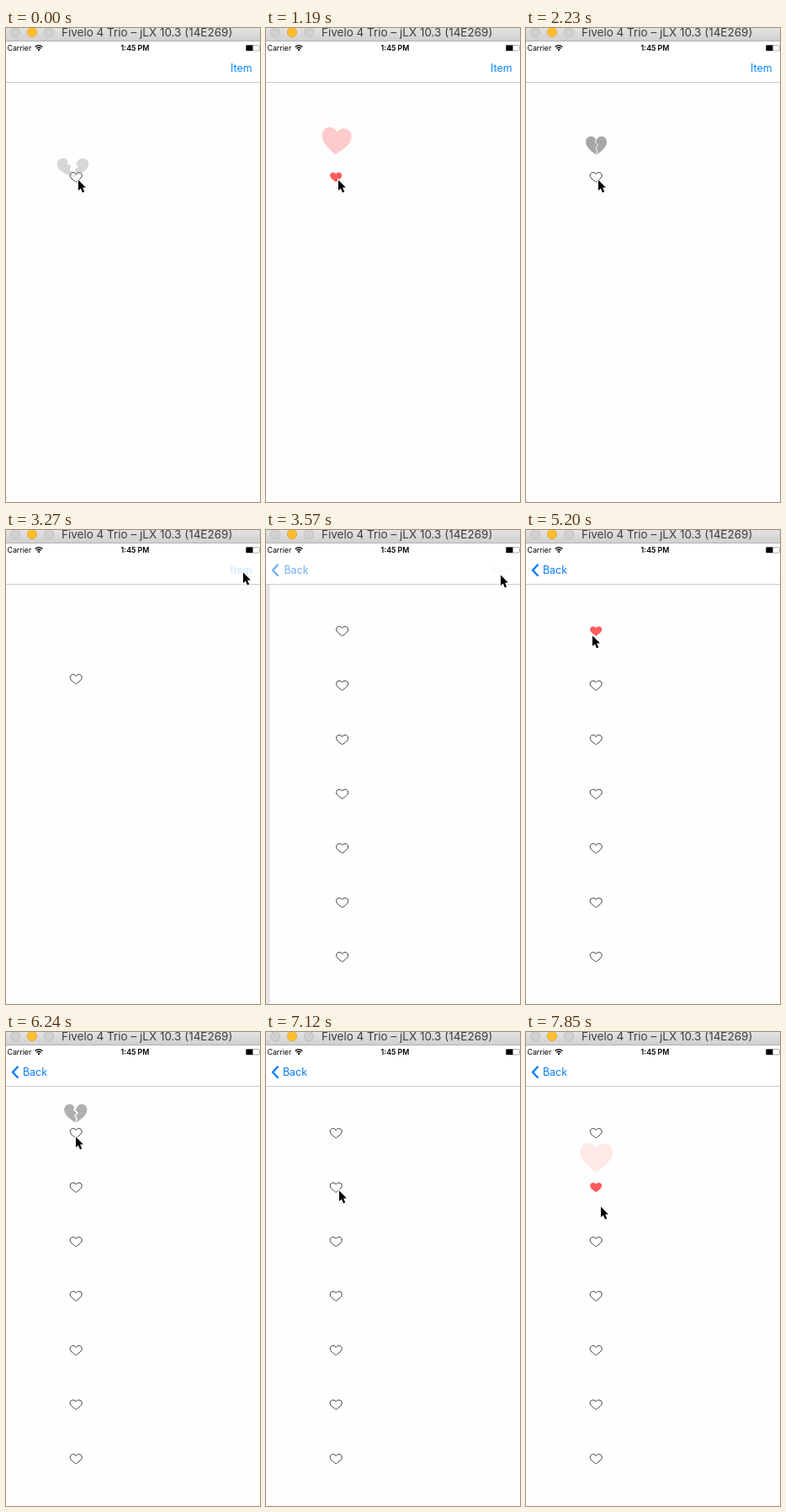
Animation, 302 px wide and 563 px high, one loop 8000 ms. Source, as an HTML page:

```html
<!DOCTYPE html>
<html lang="en">
<head>
<meta charset="utf-8">
<title>Like button</title>
<style>
  html, body { margin: 0; width: 100%; height: 100%; overflow: hidden; background: #fefefe; }
  svg { display: block; width: 302px; height: 563px; font-family: Inter, Roboto, sans-serif; }
  .small { fill: none; stroke: #3a3a3a; stroke-width: 1; }
  .small.on { fill: #ff5a5c; stroke: none; }
</style>
</head>
<body>
<svg viewBox="0 0 302 563">
  <defs>
    <linearGradient id="bar" x2="0" y2="1">
      <stop stop-color="#e3e3e3"/><stop offset="1" stop-color="#d0d0d0"/>
    </linearGradient>
    <path id="heart" vector-effect="non-scaling-stroke" d="M0 46C-6 36-50 14-50-18C-50-36-38-46-25-46C-12-46-3-38 0-30C3-38 12-46 25-46C38-46 50-36 50-18C50 14 6 36 0 46Z"/>
  </defs>

  <rect width="302" height="563" fill="#fefefe"/>
  <g id="first"></g>
  <rect id="dim" y="65" height="498"/>
  <g id="list"><rect id="sheet" y="65" width="310" height="498" fill="#fefefe"/></g>

  <rect y="15" width="302" height="49" fill="#fff"/>
  <rect y="64" width="302" height="1" fill="#cacaca"/>
  <rect width="302" height="15" fill="url(#bar)"/>
  <rect y="15" width="302" height="1" fill="#b4b4b4"/>
  <g fill="#d0d0d0" stroke="#bcbcbc" stroke-width=".8">
    <circle cx="11" cy="5" r="5.7"/>
    <circle cx="31" cy="5" r="5.7" fill="#ffbe2f" stroke="#e2a52b"/>
    <circle cx="51" cy="5" r="5.7"/>
  </g>
  <text x="66" y="10" font-size="13.5" fill="#3d3d3d">Fivelo 4 Trio – jLX 10.3 (14E269)</text>
  <text x="1.5" y="27" font-size="8.8">Carrier</text>
  <text x="153.5" y="27" font-size="8.8" font-weight="600" text-anchor="middle">1:45 PM</text>
  <g fill="none" stroke="#000" stroke-width="1.3">
    <path d="M34.6 22.4Q39 18.8 43.4 22.4M36.3 24.3Q39 22.2 41.7 24.3"/>
    <circle cx="39" cy="26" r=".5"/>
  </g>
  <rect x="285.5" y="20.5" width="16" height="6.5" rx="1" fill="#fff" stroke="#a0a0a0" stroke-width=".8"/>
  <rect x="285.5" y="20.5" width="8" height="6.5"/>

  <g font-size="12.4" fill="#0a7cf5">
    <text id="item" x="267" y="52" fill="#0a84ff">Item</text>
    <g id="back">
      <path d="M14.5 40.8L8 47.7L14.5 54.8" fill="none" stroke="#0a7cf5" stroke-width="2.3"/>
      <text id="backText" x="20" y="52">Back</text>
    </g>
  </g>

  <use id="burst" href="#heart" fill="#ff5a5c"/>
  <g id="broken" fill="#a6a6a6">
    <path id="left" d="M0 46C-6 36-50 14-50-18C-50-36-38-46-25-46C-12-46-3-38 0-30L-6-16L9-3L-3 10L5 24Z"/>
    <path id="right" d="M0 46C6 36 50 14 50-18C50-36 38-46 25-46C12-46 3-38 0-30L-6-16L9-3L-3 10L5 24Z"/>
  </g>
  <path id="cursor" d="M1 1.5V14L3.9 11.4L6 16.4L8.2 15.4L6.1 10.6H9.9Z" stroke="#fff" stroke-width="2" paint-order="stroke"/>
</svg>
<script>
const $ = id => document.getElementById(id);
const LOOP = 8000, STEP = LOOP / 54;
const HX = 83.2, MAIN_Y = 177, rowY = i => 120 + 64.5 * i;

function addHeart(parent, y) {
  const h = document.createElementNS('http://www.w3.org/2000/svg', 'use');
  h.setAttribute('href', '#heart');
  h.setAttribute('class', 'small');
  h.setAttribute('transform', `translate(${HX} ${y + .3}) scale(.14 .124)`);
  return parent.appendChild(h);
}
const mainHeart = addHeart($('first'), MAIN_Y);
const rows = Array.from({ length: 7 }, (_, i) => addHeart($('list'), rowY(i)));

// Rising hearts and breaking hearts: start time, base y, travel
const LIKES = [[723, MAIN_Y, 62], [4470, rowY(0), 40], [7280, rowY(1), 40]];
const BREAKS = [[-1035, MAIN_Y, 38], [1790, MAIN_Y, 38], [5480, rowY(0), 28]];
const LIKE_MS = 740, POP_MS = 140, BREAK_MS = 1170;

const CURSOR = [[0, 85, 179], [2400, 85, 179], [2900, 281, 42], [3260, 281, 49],
  [3560, 278, 52], [4020, 90, 126], [4430, 78, 124], [5500, 78, 124], [5700, 82, 123],
  [6280, 82, 123], [6520, 101, 180], [6900, 86, 187], [7300, 86, 187], [7600, 88, 206]];
const ITEM = [[3095, 1], [3105, .3], [3260, .22], [3556, .05], [3700, 0]];
const BACK = [[3290, 0], [3556, .6], [3720, 1]];

const smooth = u => u * u * (3 - 2 * u);
const move = (id, s) => $(id).setAttribute('transform', s);
const fade = (id, a) => $(id).setAttribute('opacity', a);

function track(keys, t, ease = u => u) {
  const i = keys.findIndex(k => k[0] > t);
  if (i === 0) return keys[0].slice(1);
  if (i < 0) return keys[keys.length - 1].slice(1);
  const a = keys[i - 1], b = keys[i], u = ease((t - a[0]) / (b[0] - a[0]));
  return a.slice(1).map((v, j) => v + (b[j + 1] - v) * u);
}

function drawPush(t) {
  const w = Math.max(0, t - 3290) / 47.5;
  const left = (1 + w) * Math.exp(-w), x = 302 * left;
  const edge = Math.max(0, x - 2.5);
  move('first', `translate(${-100 * (1 - left)} 0)`);
  move('list', `translate(${x} 0)`);
  $('sheet').setAttribute('x', edge - x);
  $('dim').setAttribute('width', edge);
  fade('dim', .1 * (1 - left));
  fade('item', track(ITEM, t)[0]);
  fade('back', track(BACK, t)[0]);
  move('backText', `translate(${x * .2} 0)`);
}

function drawLike(t) {
  const like = LIKES.find(([s]) => t >= s - POP_MS && t < s + LIKE_MS);
  if (!like) return fade('burst', 0);
  const [start, y, rise] = like, dt = t - start;
  const p = smooth(Math.max(0, dt) / LIKE_MS);
  const width = dt < 0 ? 22 + 7 * dt / POP_MS : 22 + 19 * p;
  const tilt = 7 * Math.sin(Math.PI * 1.1 * p);
  move('burst', `translate(83.7 ${y - rise * p}) rotate(${tilt}) scale(${width / 100})`);
  fade('burst', 1 - p);
}

function drawBreak(t) {
  const crack = BREAKS.find(([s]) => t >= s && t < s + BREAK_MS);
  if (!crack) return fade('broken', 0);
  const [start, y, peak] = crack, dt = t - start;
  const up = Math.min(1, dt / 500);
  const lift = peak * (1 - (1 - up) ** 2);
  const k = (Math.max(0, dt - 600) / 430) ** 1.5;
  const size = (15 + 9 * Math.min(1, dt / 300)) / 100 * (1 + .12 * k);
  move('broken', `translate(${83.6 - 4 * k} ${y - lift + 25 * k}) scale(${size})`);
  move('left', `rotate(${-16 * k} 0 46) translate(-2 0)`);
  move('right', `rotate(${16 * k} 0 46) translate(2 0)`);
  fade('broken', Math.max(0, 1 - .55 * k));
}

function draw(now) {
  const t = Math.floor((now % LOOP + 20) / STEP) % 54 * STEP;
  mainHeart.classList.toggle('on', t >= 590 && t < 1790);
  rows[0].classList.toggle('on', t >= 4330 && t < 5480);
  rows[1].classList.toggle('on', t >= 7150);
  drawPush(t);
  drawLike(t);
  drawBreak(t);
  move('cursor', `translate(${track(CURSOR, t, smooth)})`);
}

function tick() {
  draw(performance.now());
  requestAnimationFrame(tick);
}
tick();
</script>
</body>
</html>
```
